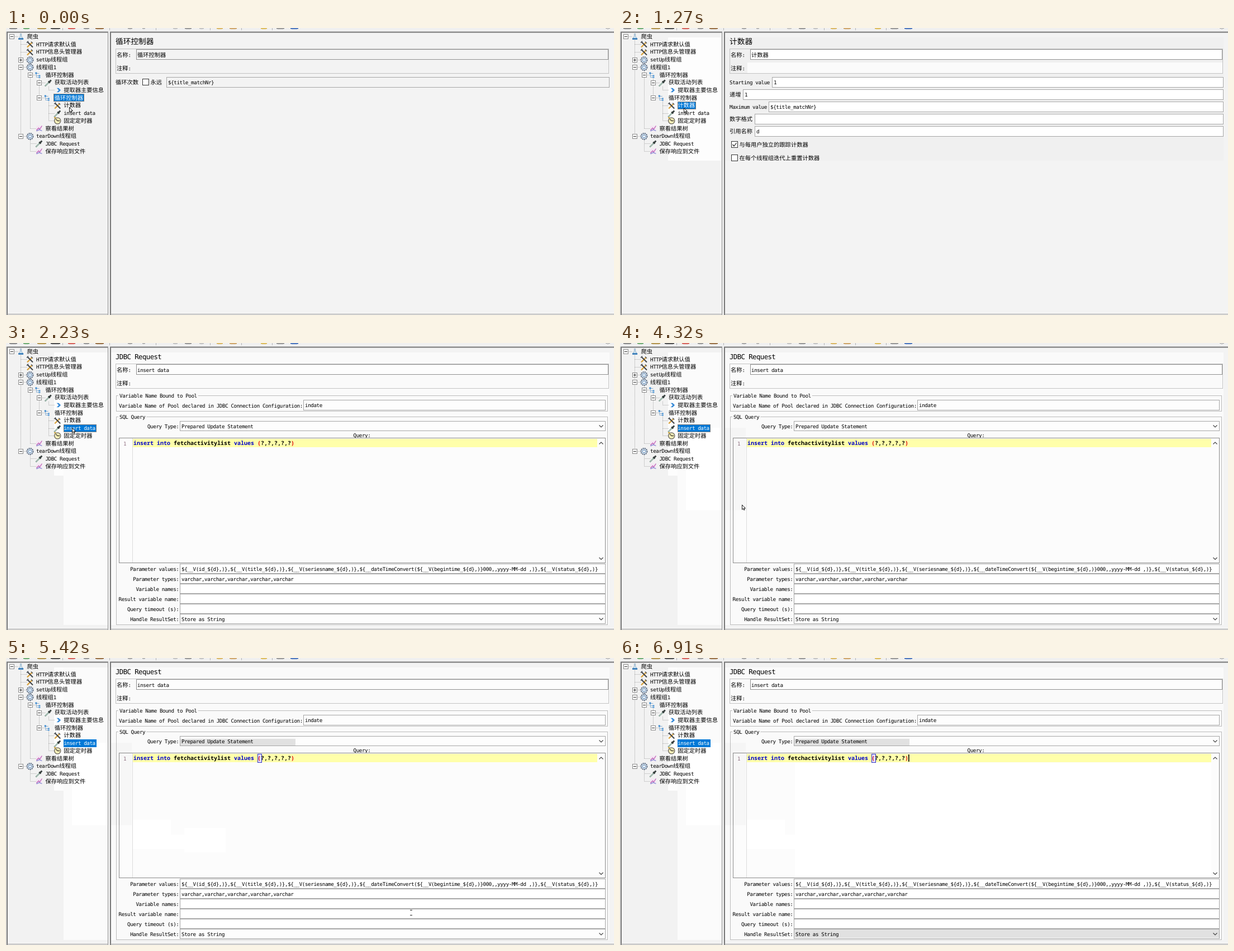
An HTML page that plays this animation: 1088 by 515 pixels, repeating every 7010 ms.

```html
<!DOCTYPE html>
<html lang="zh-CN">
<head>
<meta charset="utf-8">
<title>循环控制器</title>
<style>
html, body { margin: 0; width: 100%; height: 100%; overflow: hidden; background: #f0f0f0; }
svg { display: block; width: 1088px; height: 515px; }
text {
  font: 10.28px "Noto Sans CJK SC", "Noto Sans CJK", sans-serif;
  white-space: pre; text-rendering: geometricPrecision;
}
/* Latin letters take half the width of a Chinese character */
.m { font-family: "DejaVu Sans Mono", "Liberation Mono", monospace; font-size: .9em; letter-spacing: -.0465em; }
.title { font-size: 13.71px; }
.code { font: bold 10px "Noto Sans Mono", monospace; }
</style>
</head>
<body>
<svg id="stage" viewBox="0 0 1088 515"></svg>
<script>
const LOOP = 7010;
const stage = document.getElementById('stage');

const rect = (x, y, w, h, fill, more = '') =>
  `<rect x="${x}" y="${y}" width="${w}" height="${h}" fill="${fill}" ${more}/>`;
const box = (x, y, x2, y2, fill = '#fff', stroke = '#a6a6a6') =>
  rect(x + .5, y + .5, x2 - x - 1, y2 - y - 1, fill, `stroke="${stroke}"`);
const path = (d, stroke, width = 1, more = 'fill="none"') =>
  `<path d="${d}" stroke="${stroke}" stroke-width="${width}" ${more}/>`;
const at = (x, y, body) => `<g transform="translate(${x} ${y})">${body}</g>`;
// spans such as "300-2230" list when the part is shown
const during = (spans, body) => `<g data-spans="${spans}">${body}</g>`;
const text = (x, y, s, more = '') =>
  `<text x="${x}" y="${y + 3.6}" ${more}>` +
  s.replace(/[\x20-\x7e]+/g, run => `<tspan class="m">${run}</tspan>`) + '</text>';
const title = s => text(196, 25.2, s, 'class="title"');

const icons = {
  flask: path('M-1 -5H1V-1L4 4H-4L-1 -1Z', '#7f9fb8', .8, 'fill="#cfe4f2"') +
    path('M-4.5 4H4.5', '#2d75b5', 2.6),
  tools: path('M-5 5L4 -4', '#d9a23c', 2.4) + path('M-5 -5L5 5', '#3d4146', 2) +
    path('M2 -5L5 -2M-6 -3L-3 -6', '#5a5f66', 1.6),
  gear: '<circle r="5.4" fill="#dfe9f3" stroke="#64748a" stroke-width="2.2" stroke-dasharray="2.2 1"/>' +
    '<circle r="2.6" fill="#f4f8fc" stroke="#4f7fb0"/>',
  loop: path('M-3 -4V4M-3 -3H2M-3 1H3M-3 4H3', '#8fb2d3') +
    rect(-5, -5, 3, 3, '#3d8bd0') + rect(1, 0, 3, 2, '#3d8bd0') + rect(1, 3, 3, 2, '#3d8bd0'),
  pipette: path('M-6 6L1 -1', '#6f8f82', 2.4) + path('M-5.4 5.4L0 0', '#d9efe2', 1) +
    path('M0 -3L3 0M1 -1L5 -5', '#38403f', 2.8),
  arrow: path('M-4 -4H0L4 0L0 4H-4L0 0Z', '#fff', .5, 'fill="#2f86d6"'),
  clock: '<circle r="5.6" fill="#f5efb8" stroke="#77736a" stroke-width="1.5"/>' +
    path('M-3 -3L0 0H4', '#4b4638', 1.3) + path('M-6 -5L-3 -6', '#d8a93a', 2),
  graph: rect(-5, -5, 10, 10, '#f5e6f4') + path('M-5 3L-1 -1L1 1L5 -5', '#bd5fb5', 1.3) +
    path('M-5 4.5L0 2L5 4', '#7886cf', 1.3)
};

// depth, icon, label, expander
const rows = [
  [0, 'flask', '爬虫', '-'], [1, 'tools', 'HTTP请求默认值'], [1, 'tools', 'HTTP信息头管理器'],
  [1, 'gear', 'setUp线程组', '+'], [1, 'gear', '线程组1', '-'], [2, 'loop', '循环控制器', '-'],
  [3, 'pipette', '获取活动列表', '-'], [4, 'arrow', '提取器主要信息'], [3, 'loop', '循环控制器', '-'],
  [4, 'tools', '计数器'], [4, 'pipette', 'insert data'], [4, 'clock', '固定定时器'],
  [2, 'graph', '察看结果树'], [1, 'gear', 'tearDown线程组', '-'],
  [2, 'pipette', 'JDBC Request'], [2, 'graph', '保存响应到文件']
];
const rowY = i => 15.4 + 13.72 * i;
const labelX = d => 37.6 + 16.4 * d;
const lineX = d => Math.round(10 + 16.4 * d) + .5;

function tree() {
  let lines = '', parts = '';
  rows.forEach(([d, icon, label, sign], i) => {
    const y = Math.round(rowY(i)) + .5, x = lineX(d);
    lines += `M${x} ${y}H${labelX(d) - 16}`;
    if (d) {
      let p = i - 1;
      while (rows[p][0] >= d) p--;
      const next = rows.findIndex((r, k) => k > i && r[0] <= d);
      if (next < 0 || rows[next][0] < d) lines += `M${x} ${Math.round(rowY(p)) + 7}V${y}`;
    }
    if (sign) {
      parts += box(x - 4.5, y - 4.5, x + 4.5, y + 4.5, '#fafafa', '#8c8c8c') +
        path(`M${x - 2.5} ${y}H${x + 2.5}` + (sign === '+' ? `M${x} ${y - 2.5}V${y + 2.5}` : ''), '#333');
    }
    parts += at(labelX(d) - 11 + (icon === 'loop' ? -2 : icon === 'arrow' ? 2 : 0), y, icons[icon]) +
      text(labelX(d), rowY(i), label);
  });
  return path(lines, '#a8a8a8', 1, 'fill="none" stroke-dasharray="1 1"') + parts;
}

function selection(i, width) {
  const x = Math.floor(labelX(rows[i][0])) - 1 + (rows[i][0] === 4 ? 1 : 0), y = Math.round(rowY(i)) - 7;
  return rect(x, y, width, 14, '#0078d7') + text(labelX(rows[i][0]), rowY(i), rows[i][2], 'fill="#fff"');
}
const focusRing = (i, width) => {
  const x = Math.floor(labelX(rows[i][0])) - 1 + (rows[i][0] === 4 ? 1 : 0), y = Math.round(rowY(i)) - 7;
  return rect(x + .5, y + .5, width - 1, 13, 'none', 'stroke="#ff8728" stroke-dasharray="1 1"');
};

function toolbar() {
  const bits = [
    [6, 14, '#777'], [31, 11, '#58a05c'], [56, 16, '#a8842f'], [80, 17, '#333'], [111, 13, '#d34a42'],
    [139, 10, '#888'], [160, 15, '#8a5a26'], [218, 8, '#999'], [244, 5, '#aaa'], [299, 8, '#bbb'],
    [320, 12, '#888'], [346, 8, '#bbb'], [377, 11, '#d8ad4a'], [400, 13, '#c99750'],
    [456, 11, '#d9b23e'], [484, 14, '#888'], [509, 14, '#2c5fb5']
  ];
  return bits.map(([x, w, c]) => rect(x, 0, w, 1.5, c) + rect(x + 2, 1.5, w - 4, 1, c, 'opacity=".45"')).join('') +
    [101, 185, 268, 365, 421, 476].map(x => rect(x, 0, 1, 4, '#b5b5b5')).join('') +
    path('M1073 0Q1077 3 1081 0', '#999');
}

const frames =
  rect(0, 0, 1088, 515, '#f0f0f0') + toolbar() +
  rect(1, 7, 182, 508, '#f2f2f2') + rect(186, 7, 902, 508, '#f3f3f3') +
  during('300-2230', rect(86, 17, 95, 221, '#fdfdfd') + rect(188, 17, 892, 221, '#f0f0f0')) +
  during('2230-7010', rect(86, 17, 17, 221, '#fdfdfd') + rect(103, 17, 79, 489, '#fbfbfb') +
    rect(188, 17, 892, 489, '#fafafa')) +
  during('4320-7010', rect(118, 152, 64, 148, '#fff')) +
  path('M2 515V7.5H183', '#777', 2) + rect(182, 7, 1, 508, '#8d8d8d') + rect(2, 513, 181, 1, '#9a9a9a') +
  path('M187 515V7.5H1088', '#777', 2) + rect(187, 513, 901, 1, '#9a9a9a');

const header = (name, fill) =>
  title(name) + box(196, 37, 1079, 82, 'none', '#c3c3c3') +
  text(198, 48, '名称:') + box(233, 38, 1078, 57, fill, '#909090') +
  text(235, 48, name === 'JDBC Request' ? 'insert data' : name) + text(198, 72, '注释:');

const field = (x, y, value = '', fill = '#fff', right = 1080) =>
  box(x, y - 9, right, y + 10, fill) + text(x + 3, y + .5, value);
const check = (x, y, on, label) =>
  box(x, y - 6, x + 12, y + 6, '#fff', '#333') +
  (on ? path(`M${x + 2.5} ${y}L${x + 5} ${y + 3}L${x + 9.5} ${y - 3}`, '#222', 1.2) : '') +
  text(x + 14.5, y, label);

const loopPanel = header('循环控制器', '#f3f3f3') + text(196, 97.5, '循环次数') +
  check(244, 97, false, '永远') + field(287, 97, '${title_matchNr}', '#f3f3f3');

const counterPanel = header('计数器', '#fff') + rect(228, 62, 850, 19, '#fbfbfb') +
  [['Starting value', 272, '1'], ['递增', 220, '1'], ['Maximum value', 266, '${title_matchNr}'],
   ['数字格式', 241, ''], ['引用名称', 241, 'd']]
    .map(([label, x, value], i) => text(196, 97.3 + 22.1 * i, label) + field(x, Math.round(96.6 + 22.1 * i), value)).join('') +
  check(199, 209, true, '与每用户独立的跟踪计数器') + check(199, 233, false, '在每个线程组迭代上重置计数器');

const group = (y, y2, label) =>
  box(197, y, 1077, y2, 'none', '#bcbcbc') + rect(201, y - 4, label.length * 5.14 + 4, 9, '#fafafa') + text(203, y, label);
const formRow = (y, label, value = '', fill = '#fff') =>
  text(309.5, y, label, 'text-anchor="end"') + box(311, y - 9, 1073, y + 9, fill) + text(314, y, value);
const chevron = (x, y, dir) => path(`M${x - 3.5} ${y - 2 * dir}L${x} ${y + 1.5 * dir}L${x + 3.5} ${y - 2 * dir}`, '#444', 1.2);

const values = ['id', 'title', 'seriesname'].map(v => '${__V(' + v + '_${d},)},').join('') +
  '${__dateTimeConvert(${__V(begintime_${d},)}000,,yyyy-MM-dd ,)},${__V(status_${d},)}';

const colored = (color, s) => `<tspan fill="${color}">${s}</tspan>`;
const sql = colored('#0000c8', 'insert into') + ' fetchactivitylist ' + colored('#0000c8', 'values') + ' ' +
  colored('#e00000', '(') + '?,?,?,?,?' + colored('#e00000', ')');

const requestPanel = header('JDBC Request', '#fdfdfd') +
  group(94, 123, 'Variable Name Bound to Pool') +
  text(202, 112, 'Variable Name of Pool declared in JDBC Connection Configuration:') +
  field(532, 111, 'indate', '#fdfdfd', 1073) +
  group(132, 506, 'SQL Query') +
  formRow(149, 'Query Type:', '', '#fdfdfd') +
  during('5000-7010', rect(312, 145, 206, 12, '#e1e1e1')) +
  text(314, 149.5, 'Prepared Update Statement') + chevron(1065, 149.5, 1) +
  text(621.5, 165, 'Query:') +
  box(202, 170, 1073, 395, '#fcfcfc', '#8c8c8c') +
  during('4470-7010', rect(227, 290, 68, 53, '#fff') + rect(288, 317, 34, 26, '#fff')) +
  during('5420-7010', rect(319, 305, 74, 44, '#fff')) +
  during('5550-7010', rect(313, 188, 745, 206, '#fff')) +
  rect(226, 171, 1, 223, '#dcdcdc') + rect(227, 172, 831, 15, '#ffffaa') +
  text(210, 180, '1', 'fill="#8f6f80"') + chevron(1065, 179.5, -1) + chevron(1065, 387, 1) +
  during('5150-7010', box(450, 172, 458, 188, '#e4e0ff', '#3030c0')) +
  `<text x="228" y="183" class="code">${sql}</text>` +
  during('5000-5420 5970-6380 6910-7010', rect(516, 173, 1.6, 13, '#000')) +
  formRow(405, 'Parameter values:', values) +
  formRow(423, 'Parameter types:', Array(5).fill('varchar').join(',')) +
  formRow(441, 'Variable names:') + formRow(459, 'Result variable name:') +
  formRow(477, 'Query timeout (s):') + formRow(495, 'Handle ResultSet:', '', '#fdfdfd') +
  during('5550-7010', rect(312, 487, 760, 15, '#e1e1e1')) +
  text(314, 495, 'Store as String') + chevron(1065, 495.5, 1) +
  during('4320-7010', rect(188, 152, 37, 148, '#000', 'opacity=".02"'));

const arrow = path('M.5 .5V8.9L2.5 7.1L3.8 9.9L5 9.4L3.8 6.6H6.5Z', '#000', .9, 'fill="#fff"');
const beam = rect(0, 1, 4, 1, '#222') + rect(0, 10, 4, 1, '#222');

stage.innerHTML = frames + tree() +
  during('0-300', selection(8, 55) + focusRing(8, 55)) +
  during('300-2230', selection(9, 33) + focusRing(9, 33)) +
  during('2230-7010', selection(10, 59)) + during('2230-5000', focusRing(10, 59)) +
  during('0-300', loopPanel) + during('300-2230', counterPanel) + during('2230-7010', requestPanel) +
  '<g id="pointer">' + during('0-4470 5550-6090', arrow) + during('4470-5550', beam) + '</g>';

// time, x, y
const stops = [
  [0, 113, 142], [1270, 114, 143], [1390, 115, 146], [1540, 115, 148], [1660, 115, 150],
  [1940, 117, 152], [2090, 118, 152], [4320, 218, 290], [4470, 288, 333], [4600, 315, 317],
  [4750, 389, 262], [4880, 470, 205], [5000, 512, 176], [5300, 642, 345], [5420, 723, 451],
  [5550, 1061, 490]
];
const pointer = document.getElementById('pointer');
const timed = [...stage.querySelectorAll('[data-spans]')].map(el =>
  [el, el.dataset.spans.split(' ').map(s => s.split('-').map(Number))]);

function draw(now) {
  const t = now % LOOP;
  for (const [el, spans] of timed) {
    el.style.display = spans.some(([a, b]) => t >= a && t < b) ? '' : 'none';
  }
  const [, x, y] = stops.filter(s => s[0] <= t).pop();
  pointer.setAttribute('transform', `translate(${x} ${y})`);
}

const start = performance.now();
function tick() {
  draw(performance.now() - start);
  requestAnimationFrame(tick);
}
tick();
</script>
</body>
</html>
```
